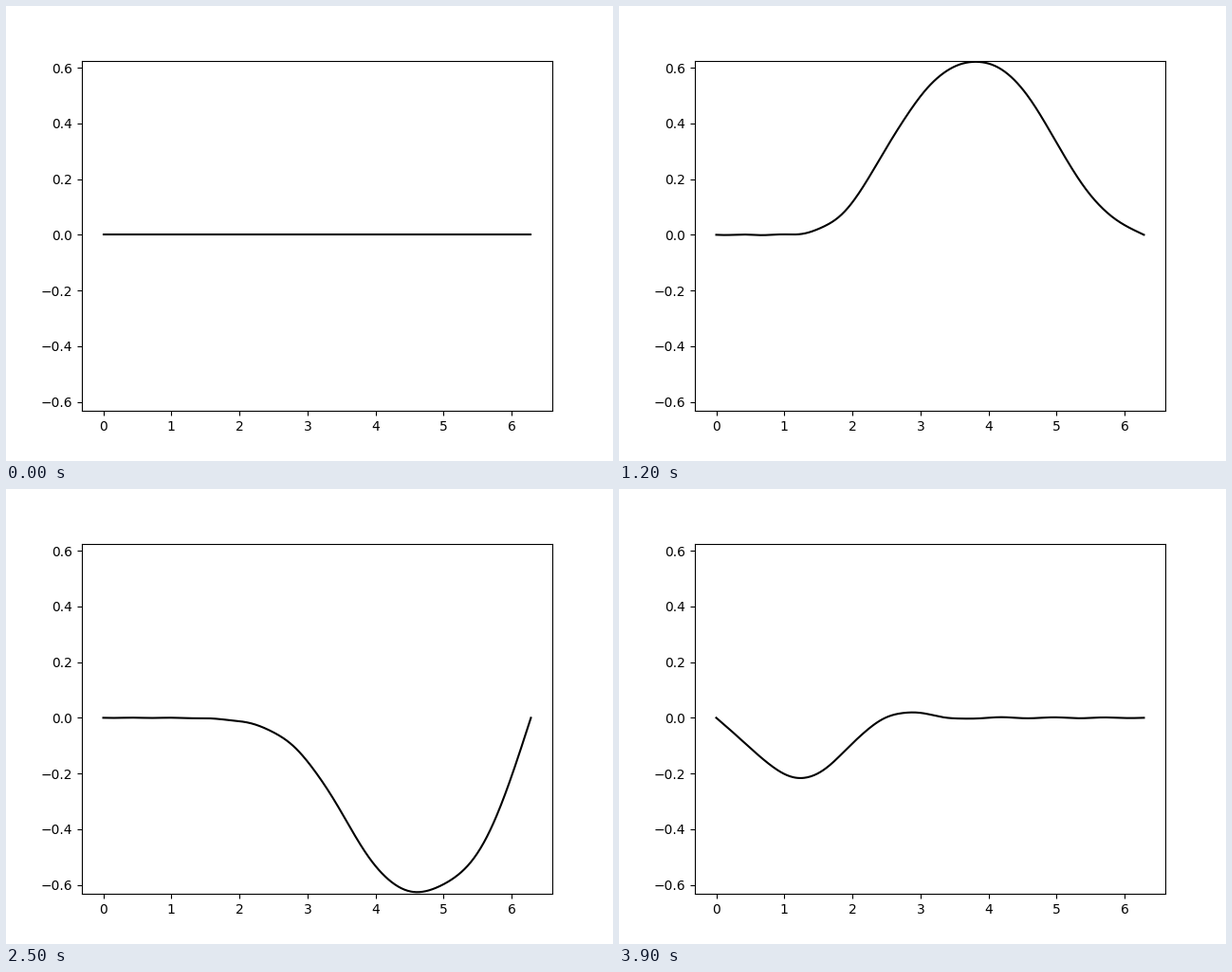
A matplotlib script that plays this animation: 640 by 480 pixels, repeating every 4000 ms.

```python
import numpy as np
import matplotlib.pyplot as plt
from matplotlib.animation import FuncAnimation

FRAMES = 40
STEP = 0.3167            # wave time per frame
LENGTH = 2 * np.pi
CELL = LENGTH / 25       # grid spacing that makes short waves lag

x = np.linspace(0, LENGTH, 400)
velocity = 0.847 * np.exp(-((x - LENGTH / 5) / 0.6) ** 2 / 2)

# Sine modes of a string fixed at both ends, struck near the left
k = np.arange(1, 25) / 2
modes = np.sin(np.outer(x, k))
weights = velocity @ modes * (x[1] - x[0]) * 2 / LENGTH
omega = 2 / CELL * np.sin(k * CELL / 2)


def string(t):
    return modes @ (weights / omega * np.sin(omega * t))


fig, ax = plt.subplots(figsize=(6.4, 4.8), dpi=100)
line, = ax.plot(x, string(0), color="black", lw=1.5)
ax.set_ylim(-0.6325, 0.6255)


def update(i):
    line.set_ydata(string(i * STEP))
    return line,


anim = FuncAnimation(fig, update, frames=FRAMES, interval=100,
                     repeat=True, repeat_delay=0)
plt.show()
```
